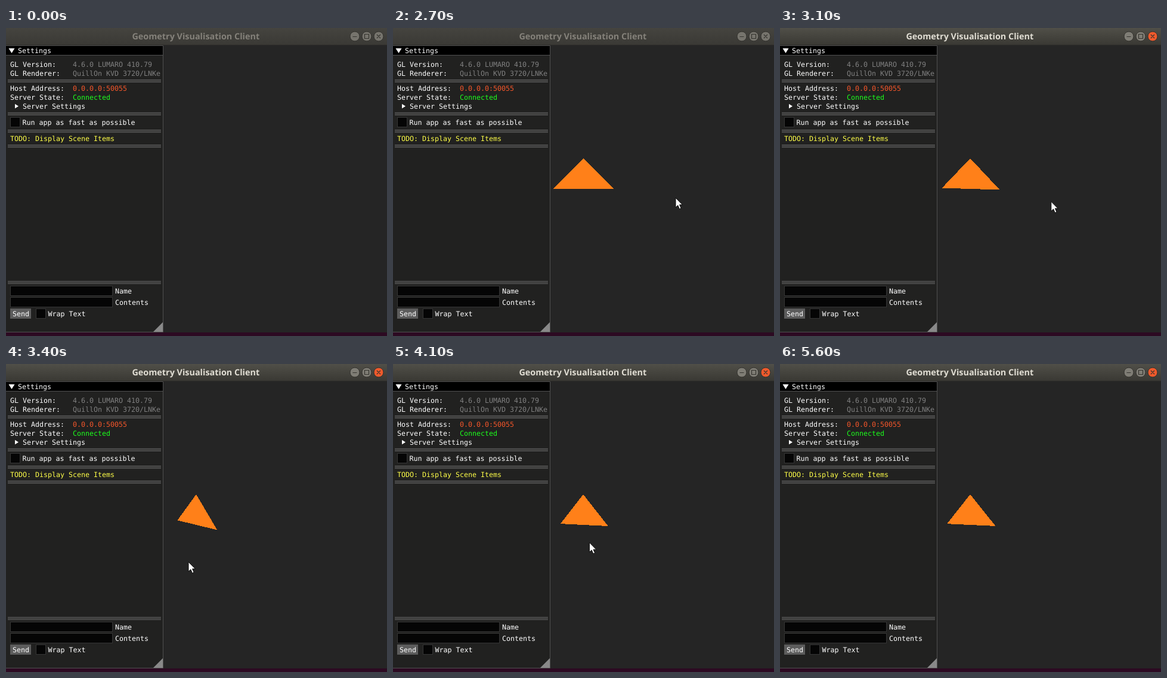
Animation of 639 by 515 pixels, one loop 5700 ms. Source, as an HTML page:

```html
<!DOCTYPE html>
<html lang="en">
<head>
<meta charset="utf-8">
<title>Geometry Visualisation Client</title>
<style>
  html, body { margin: 0; width: 100%; height: 100%; overflow: hidden; background: #252525; }
  svg { display: block; width: 100%; height: 100%; }
  text { font: 11.63px "DejaVu Sans Mono", monospace; fill: #fff; white-space: pre; text-rendering: geometricPrecision; }
  #title { font: bold 14.4px "Open Sans", "Noto Sans", sans-serif; fill: #84817a; text-anchor: middle; }
  .button { fill: #76746d; stroke: #33322e; }
  .glyph { fill: none; stroke: #35342f; stroke-width: 1.2; }
  .field { fill: #050505; stroke: #353535; }
  .focused #title { fill: #e0ddd3; }
  .focused #bar { fill: url(#barActive); }
  .focused .button { fill: #7f7d75; }
  .focused #close { fill: #f05a2c; }
</style>
</head>
<body>
<svg id="stage" viewBox="0 0 639 515" xmlns="http://www.w3.org/2000/svg">
  <defs>
    <linearGradient id="barIdle" x2="0" y2="1">
      <stop stop-color="#45443f"/><stop offset="1" stop-color="#3a3935"/>
    </linearGradient>
    <linearGradient id="barActive" x2="0" y2="1">
      <stop stop-color="#504f48"/><stop offset="1" stop-color="#393833"/>
    </linearGradient>
  </defs>

  <rect width="639" height="515" fill="#252525"/>
  <rect y="509" width="639" height="6" fill="#2c0a22"/>

  <!-- Title bar -->
  <rect id="bar" width="639" height="29" fill="url(#barIdle)"/>
  <rect y="28" width="639" height="1" fill="#2d2c29"/>
  <text id="title" x="318.3" y="19">Geometry Visualisation Client</text>
  <circle class="button" cx="585" cy="14" r="8"/>
  <circle class="button" cx="605" cy="14" r="8"/>
  <circle class="button" id="close" cx="625" cy="14" r="8"/>
  <path class="glyph" d="M581.5 14.5h7M601.5 10.5h7v7h-7zM622 11l6 6m0-6l-6 6"/>

  <!-- Settings panel -->
  <rect y="29" width="263" height="480" fill="#212120"/>
  <rect y="30" width="263" height="15" fill="#000"/>
  <path d="M0 29.5H263.5V508.5H0M0 45.5H263" fill="none" stroke="#505050"/>
  <path d="M4.5 34h10l-5 8zM15 127v7.6l6-3.8z" fill="#fff"/>
  <path d="M263 492v16h-16z" fill="#898989"/>
  <g id="panel"></g>

  <polygon id="triangle" fill="#ff8019" shape-rendering="crispEdges"/>
  <path id="cursor" d="M0 0V16L3.8 12.6 6.4 18.6 9.2 17.4 6.6 11.6H11.4Z" fill="#fff" stroke="#0c0c0c" stroke-linejoin="round"/>
</svg>
<script>
const $ = id => document.getElementById(id);
const LOOP = 5700, STEP = 100;
const APPEAR = 1700, ENTER = 2300, PRESS = 2900, RELEASE = 4600, LEAVE = 5000;
const GREY = "#808080";

function add(name, attributes, content = "") {
  const node = document.createElementNS("http://www.w3.org/2000/svg", name);
  for (const key in attributes) node.setAttribute(key, attributes[key]);
  node.textContent = content;
  $("panel").append(node);
}
const label = (x, y, content, fill = "#fff") => add("text", { x, y, style: `fill:${fill}` }, content);
const field = (x, y, width) => add("rect", { x: x + .5, y: y + .5, width: width - 1, height: 16, class: "field" });

function property(y, name, value, fill) {
  label(7, y, name);
  label(112, y, value, fill);
}
function input(y, name) {
  field(7, y, 172);
  label(183, y + 13, name);
}
function checkbox(x, y, name) {
  field(x, y, 17);
  label(x + 20.5, y + 13, name);
}
function separator(y) {
  for (let line = 0; line < 3; line++)
    add("rect", { x: 3, y: y + 2 * line, width: 257, height: 1, fill: "#626262" });
}

label(20, 42, "Settings");
property(65, "GL Version:", "4.6.0 LUMARO 410.79", GREY);
property(80, "GL Renderer:", "QuillOn KVD 3720/LNKe", GREY);
separator(86);
property(105, "Host Address:", "0.0.0.0:50055", "#f4562a");
property(120, "Server State:", "Connected", "#1cff1c");
label(28, 135, "Server Settings");
separator(141);
checkbox(7, 149, "Run app as fast as possible");
separator(170);
label(7, 189, "TODO: Display Scene Items", "#ffff48");
separator(195);
separator(423);
input(431, "Name");
input(450, "Contents");
add("rect", { x: 7, y: 469, width: 35, height: 17, fill: "#5c5c5c" });
label(11, 482, "Send");
checkbox(50, 469, "Wrap Text");

// Turning points of the pointer
const stops = [
  { at: ENTER, x: 628, y: 265 },
  { at: 2400, x: 541, y: 261 },
  { at: 2500, x: 541, y: 261 },
  { at: 2700, x: 474, y: 284 },
  { at: 3020, x: 474, y: 285 },
  { at: 3400, x: 306, y: 331 },
  { at: 3700, x: 282, y: 306 },
  { at: 4300, x: 346, y: 296 },
  { at: 4700, x: 344, y: 297 },
  { at: 4800, x: 270, y: 202 }
];

const clamp = (value, low, high) => Math.min(high, Math.max(low, value));
const mix = (a, b, k) => a + (b - a) * k;

function pointer(time) {
  const next = clamp(stops.findIndex(stop => stop.at > time), 1, stops.length - 1);
  const from = time >= stops.at(-1).at ? stops.at(-1) : stops[next - 1];
  const to = from === stops.at(-1) ? from : stops[next];
  const k = clamp((time - from.at) / (to.at - from.at || 1), 0, 1);
  const eased = k * k * (3 - 2 * k);
  return { x: mix(from.x, to.x, eased), y: mix(from.y, to.y, eased) };
}

// Dragging orbits the camera around the middle of the triangle's base
function triangle(time) {
  const LEAD = 80, TURN = .005, HALF = 51, DISTANCE = 700;
  const start = pointer(PRESS), drag = pointer(clamp(time + LEAD, PRESS, RELEASE));
  const yaw = (start.x - drag.x) * TURN, pitch = (drag.y - start.y) * TURN;
  const corner = side => {
    const depth = side * HALF * Math.sin(yaw);
    const scale = 1 / (1 - depth / DISTANCE);
    return [319 + side * HALF * Math.cos(yaw) * scale, 269 + depth * Math.sin(pitch) * scale];
  };
  return `319,218 ${corner(-1)} ${corner(1)}`;
}

const show = (id, visible) => $(id).style.display = visible ? "" : "none";

function draw(now) {
  const time = Math.floor(now % LOOP / STEP) * STEP;
  const { x, y } = pointer(time);

  $("stage").classList.toggle("focused", time >= PRESS);
  $("triangle").setAttribute("points", triangle(time < PRESS ? 0 : time));
  $("cursor").setAttribute("transform", `translate(${x} ${y})`);
  show("triangle", time >= APPEAR);
  show("cursor", time >= ENTER && time < LEAVE);
  requestAnimationFrame(draw);
}
draw(performance.now());
</script>
</body>
</html>
```
